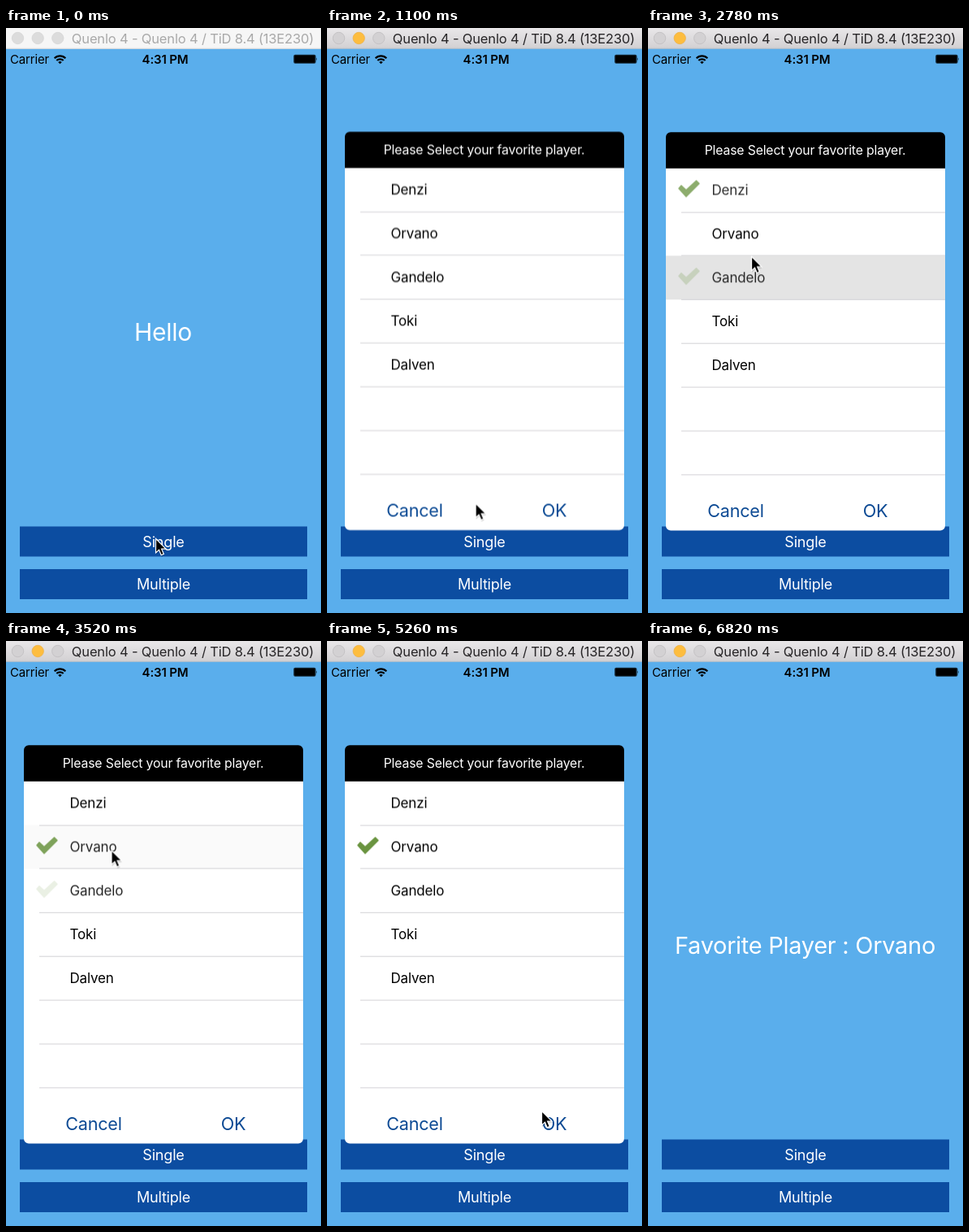
Write an HTML page that moves like this. It is 388 px wide and 720 px high and loops after 6.84 s.

```html
<!DOCTYPE html>
<html lang="en">
<head>
<meta charset="utf-8">
<title>Picker demo</title>
<style>
html, body { margin: 0; width: 100%; height: 100%; overflow: hidden; background: #5aaeec; }
svg { display: block; width: 388px; height: 720px; }
text { font-family: Inter, "Open Sans", sans-serif; letter-spacing: -.01em; }
.mid { text-anchor: middle; }
.button rect { fill: #0c4da1; }
.button text { fill: #fff; font-size: 18px; }
.label { fill: #fff; }
.action { fill: #0c4a94; font-size: 21.6px; }
.row text { font-size: 17px; }
.check { fill: #6a9440; stroke: #6a9440; stroke-width: 1.5; stroke-linejoin: round; }
.check, .flash { opacity: 0; }
.flash { fill: #dcdcdc; }

/* One cycle for every moving part */
.idle, .hello, .result, .dialog, .cursor, .flash, .check, .tapped text {
  animation: 6.84s linear infinite;
}
.idle { animation-name: idle; }
.hello { animation-name: hello; }
.result { animation-name: result; }
/* Damped spring, with a plain curve where linear() is missing */
.dialog {
  animation-name: slide;
  animation-timing-function: cubic-bezier(.08, .75, .12, 1.2);
  animation-timing-function: linear(0, .148 5%, .368 10%, .588 15%, .768 20%, .899 25%,
    .982 30%, 1.026 35%, 1.044 40%, 1.046 45%, 1.038 50%, 1.028 55%, 1.018 60%,
    1.004 70%, .999 80%, 1);
}
.cursor { animation-name: point; animation-timing-function: ease-in-out; }
.flash { animation-name: flash; animation-delay: calc(var(--tap) - 80ms); }
.check { animation-name: pick; animation-delay: var(--tap); animation-timing-function: ease-in-out; }
.tapped text { animation-name: dip; animation-delay: var(--tap); }
.kept .check { animation-name: keep; }
.kept text { animation-name: dip-once; }

@keyframes idle { 0%, 5.84% { opacity: 1 } 5.85%, 100% { opacity: 0 } }
@keyframes hello { 0%, 86.7% { opacity: 1 } 86.71%, 100% { opacity: 0 } }
@keyframes result { 0%, 86.7% { opacity: 0 } 86.71%, 100% { opacity: 1 } }

@keyframes slide {
  0%, 10.51% { transform: translateY(694px) }
  17.82%, 79.39% { transform: translateY(0) }
  86.7%, 100% { transform: translateY(694px) }
}

@keyframes point {
  0%, 13.16% { transform: translate(184px, 628px) }
  26.32%, 31.43% { transform: translate(170px, 204px) }
  37.43% { transform: translate(128px, 300px) }
  39.18% { transform: translate(128px, 300px); animation-timing-function: ease-in }
  40.64% { transform: translate(127px, 281px); animation-timing-function: ease-out }
  43.86% { transform: translate(128px, 254px) }
  50.44% { transform: translate(128px, 254px); animation-timing-function: ease-in }
  60.23% { transform: translate(206px, 424px); animation-timing-function: ease-out }
  71.64%, 81.87% { transform: translate(264px, 578px) }
  91.37%, 100% { transform: translate(-20px, 500px) }
}

@keyframes flash { 0%, 1.17% { opacity: 1; animation-timing-function: ease-in-out } 5.56%, 100% { opacity: 0 } }
@keyframes pick { 0% { opacity: 0 } 4.39%, 9.06% { opacity: 1 } 13.45%, 100% { opacity: 0 } }
@keyframes keep { 0% { opacity: 0 } 4.39%, 38.4% { opacity: 1 } 38.41%, 100% { opacity: 0 } }
@keyframes dip {
  0%, 4.39%, 9.06%, 13.45%, 100% { opacity: 1 }
  2.19%, 11.25% { opacity: .75 }
}
@keyframes dip-once { 0%, 4.39%, 100% { opacity: 1 } 2.19% { opacity: .75 } }
</style>
</head>
<body>
<svg viewBox="0 0 388 720">
  <defs>
    <linearGradient id="bar" x2="0" y2="1">
      <stop offset="0" stop-color="#e9e7e9"/>
      <stop offset="1" stop-color="#d2d0d2"/>
    </linearGradient>
    <clipPath id="card"><rect x="22" y="128.2" width="344" height="490.2" rx="6"/></clipPath>
    <path id="tick" d="M38 25 41 21.5 47 27 59.5 15.5 63 19 47 35Z"/>
  </defs>

  <rect width="388" height="720" fill="#5aaeec"/>

  <!-- Status bar -->
  <text x="5" y="43.5" font-size="15">Carrier</text>
  <g fill="none" stroke="#000" stroke-width="2.2">
    <path d="M59.7 37.2a9.6 9.6 0 0 1 13.6 0M62.3 40a6 6 0 0 1 8.4 0"/>
    <path d="M66.5 44.3 64.2 42a3.3 3.3 0 0 1 4.6 0Z" fill="#000" stroke="none"/>
  </g>
  <text class="mid" x="196" y="43.5" font-size="15" font-weight="600">4:31 PM</text>
  <rect x="354.2" y="32.8" width="27.4" height="11" rx="2" fill-opacity=".75"/>
  <rect x="355.4" y="33.8" width="25" height="9" rx="1"/>
  <path d="M382.3 36.2q1.6 2.1 0 4.3Z"/>

  <!-- Main screen -->
  <text class="mid label hello" x="193.5" y="385" font-size="30">Hello</text>
  <text class="mid label result" x="193.5" y="384.5" font-size="29">Favorite Player : Orvano</text>
  <g class="button">
    <rect x="17" y="613.5" width="354" height="37"/>
    <text class="mid" x="194" y="638.5">Single</text>
  </g>
  <g class="button">
    <rect x="17" y="666" width="354" height="37"/>
    <text class="mid" x="194" y="691">Multiple</text>
  </g>

  <!-- Picker -->
  <g class="dialog">
    <g clip-path="url(#card)">
      <rect x="22" y="128" width="344" height="491" fill="#fff"/>
      <rect x="22" y="128" width="344" height="44.8"/>
      <text class="mid" x="193.5" y="156" font-size="15.8" fill="#fff">Please Select your favorite player.</text>
      <g id="rows"></g>
      <text class="mid action" x="108" y="602">Cancel</text>
      <text class="mid action" x="280" y="602">OK</text>
    </g>
  </g>

  <!-- Window bar -->
  <rect width="388" height="25.5" fill="url(#bar)"/>
  <path d="M0 25.2H388" stroke="#b9bcc2" stroke-width=".8"/>
  <g stroke-width=".8">
    <circle cx="14.5" cy="12.5" r="7.2" fill="#d3d1d3" stroke="#bfbdbf"/>
    <circle cx="39.2" cy="12.5" r="7.2" fill="#fdbd3f" stroke="#ecb04a"/>
    <circle cx="63.8" cy="12.5" r="7.2" fill="#d3d1d3" stroke="#bfbdbf"/>
  </g>
  <text class="mid" x="230" y="18.5" font-size="16.5" fill="#272527">Quenlo 4 - Quenlo 4 / TiD 8.4 (13E230)</text>
  <g class="idle">
    <rect width="388" height="25.5" fill="#f6f6f6"/>
    <path d="M0 25.2H388" stroke="#d8dade" stroke-width=".8"/>
    <g fill="#dcdcdc" stroke="#d0d0d0" stroke-width=".6">
      <circle cx="14.5" cy="12.5" r="7.2"/>
      <circle cx="39.2" cy="12.5" r="7.2"/>
      <circle cx="63.8" cy="12.5" r="7.2"/>
    </g>
    <text class="mid" x="230" y="18.5" font-size="16.5" fill="#a9a9a9">Quenlo 4 - Quenlo 4 / TiD 8.4 (13E230)</text>
  </g>

  <g class="cursor">
    <path d="M1 3V20l4-3.6 2.8 6.3 3.2-1.4-2.8-6H13.5Z" opacity=".16"/>
    <path d="M.5.5V18l4-3.7 2.7 6.4 3.1-1.3-2.7-6.2H13Z" stroke="#fff" stroke-width="1.2"/>
  </g>
</svg>
<script>
const names = ["Denzi", "Orvano", "Gandelo", "Toki", "Dalven", "", ""];
const taps = { 0: 2060, 1: 3300, 2: 2680 };
const last = 1;

document.getElementById("rows").innerHTML = names.map((name, i) => {
  const tapped = i in taps;
  const kind = tapped ? (i === last ? " tapped kept" : " tapped") : "";
  return `<g class="row${kind}" transform="translate(0 ${172.5 + 53.9 * i})" style="--tap:${taps[i] || 0}ms">
    ${tapped ? '<rect class="flash" x="22" width="344" height="54"/>' : ""}
    <path d="M41 54H366" stroke="#d3d2d6"/>
    ${tapped ? '<use class="check" href="#tick"/>' : ""}
    <text x="78.5" y="33.3">${name}</text></g>`;
}).join("");
</script>
</body>
</html>
```
